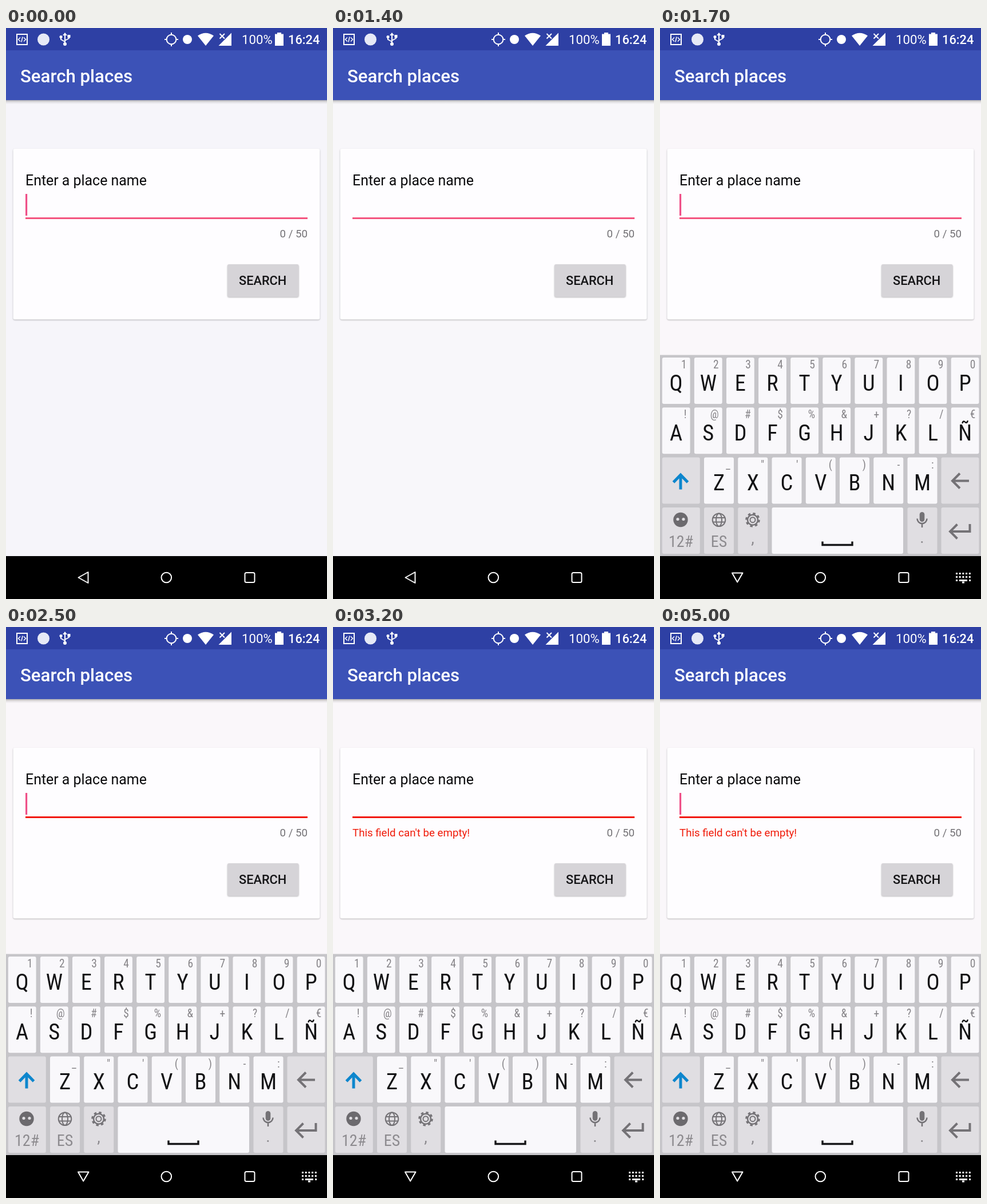
An HTML page for the animation above (5100 ms loop, 561x998 px).

```html
<!DOCTYPE html>
<html lang="en">
<head>
<meta charset="utf-8">
<title>Search places</title>
<style>
  html, body { margin: 0; width: 100%; height: 100%; overflow: hidden; background: #f8f7fa; }
  svg { display: block; width: 100%; height: 100%; font-family: Roboto, sans-serif; }
  .medium { font-weight: 500; }
  .line { fill: none; stroke: #fff; stroke-width: 2; }
  .raised { filter: drop-shadow(0 1.3px 1.3px rgba(0, 0, 0, .28)); }
  #keyboard text { font-family: "Roboto Condensed", Roboto, sans-serif; font-stretch: 75%; }
  .letter { font-size: 38.5px; fill: #121214; text-anchor: middle; }
  .hint { font-size: 19.5px; fill: #858387; text-anchor: end; }
  .label { font-size: 28px; fill: #8d8b8f; text-anchor: middle; }
  .glyph { fill: none; stroke: #747276; }
</style>
</head>
<body>
<svg viewBox="0 0 561 998">
  <defs>
    <linearGradient id="shade" x2="0" y2="1">
      <stop stop-color="#000" stop-opacity=".3"/>
      <stop offset=".45" stop-color="#000" stop-opacity=".1"/>
      <stop offset="1" stop-color="#000" stop-opacity="0"/>
    </linearGradient>
  </defs>
  <rect id="backdrop" width="561" height="998"/>

  <!-- app bar and status bar -->
  <rect y="126" width="561" height="7" fill="url(#shade)"/>
  <rect width="561" height="126" fill="#3c52b7"/>
  <rect width="561" height="39" fill="#2e40a4"/>
  <text class="medium" x="25" y="94.5" font-size="31.2" fill="#fff">Search places</text>
  <g fill="#fff">
    <path class="line" d="M19 11H37V29H19Z"/>
    <path class="line" stroke-width="1.5" style="stroke-width:1.5" d="M25 16.5L21.5 20L25 23.5M31 16.5L34.5 20L31 23.5M29 15.5L27 24.5"/>
    <circle cx="65.5" cy="20" r="10.5" fill="#e6e9f6"/>
    <path class="line" d="M103 12V27M103 24L96 20V16M103 22L110 18V14"/>
    <path d="M103 8L107 13H99ZM107.5 12h5v5h-5Z"/>
    <circle cx="96" cy="15.5" r="2.5"/><circle cx="103" cy="28" r="3"/>
    <path class="line" d="M289 8V12M289 28V32M277 20H281M297 20H301"/>
    <circle class="line" cx="289" cy="20" r="8.3"/>
    <circle cx="317" cy="20" r="8"/>
    <path d="M349 31L335 13.5Q349 4 363 13.5Z"/>
    <path d="M394 8.5V31H371.5Z"/>
    <path class="line" d="M373.5 10L382 18.5M382 10L373.5 18.5" stroke="#fff"/>
    <path d="M474 8H481V10.5H485V31H470V10.5H474Z"/>
    <text x="412" y="28" font-size="22.2">100%</text>
    <text class="medium" x="493" y="28" font-size="21.8">16:24</text>
  </g>

  <!-- search card -->
  <rect class="raised" x="12.5" y="211" width="536" height="298.5" rx="3" fill="#fefdff"/>
  <text x="34" y="274.8" font-size="24.9" fill="#0a0a0c">Enter a place name</text>
  <rect id="cursor" x="34" y="290" width="3.2" height="38" fill="#ef4f88"/>
  <rect id="underline" x="34" y="331" width="493" height="3"/>
  <text id="error" x="34" y="365.5" font-size="18.7" fill="#f01a08">This field can't be empty!</text>
  <text x="527" y="365.5" font-size="18.7" fill="#737175" text-anchor="end">0 / 50</text>
  <rect class="raised" x="387" y="413" width="124.5" height="57" rx="3" fill="#d6d4d8"/>
  <text class="medium" x="448.7" y="449" font-size="21.8" fill="#141416" text-anchor="middle">SEARCH</text>

  <!-- navigation bar, with the keyboard sliding over it -->
  <rect y="923" width="561" height="75"/>
  <g id="keyboard"><rect y="571.5" width="561" height="351.5" fill="#c6c5c9"/></g>
  <g class="line" stroke-linejoin="round">
    <path id="back" d="M126.5 960.5L143.5 951V970Z"/>
    <path id="hide" d="M126 952.5H144.5L135.2 968.5Z"/>
    <circle cx="280.3" cy="960.5" r="8.8"/>
    <rect x="417.5" y="952" width="17" height="17" rx="2.5"/>
    <path id="switcher" stroke-width="3" style="stroke-width:3" stroke-dasharray="3 2.7" d="M517 953.5H543M517 959.5H543"/>
    <path id="switcherBar" style="stroke-width:3" d="M517 965.5h3M523 965.5H537M540 965.5h3M528 969h4"/>
  </g>
</svg>
<script>
const byId = id => document.getElementById(id);
const keyboard = byId('keyboard');
const add = markup => keyboard.insertAdjacentHTML('beforeend', markup);
const escape = s => s.replace(/&/g, '&amp;');
const rowTop = row => 576 + row * 87.3;

function key(x, row, width, fill = '#f9f8fb') {
  add(`<rect x="${x}" y="${rowTop(row)}" width="${width}" height="81" rx="3" fill="${fill}"/>`);
}

function letterRow(letters, hints, row, left, pitch, width) {
  [...letters].forEach((letter, i) => {
    const x = left + i * pitch, top = rowTop(row);
    key(x, row, width);
    add(`<text class="letter" x="${x + width / 2}" y="${top + 57.7}">${letter}</text>
      <text class="hint" x="${x + width - 6}" y="${top + 19}">${escape(hints[i])}</text>`);
  });
}

letterRow('QWERTYUIOP', '1234567890', 0, 3.8, 56.1, 48.8);
letterRow('ASDFGHJKLÑ', '!@#$%&+?/€', 1, 3.8, 56.1, 48.8);
letterRow('ZXCVBNM', `_"'()-:`, 2, 77, 59.25, 52);

const dim = '#e0dee2';
for (const row of [2, 3]) {
  key(3.8, row, 66, dim);
  key(491.5, row, 66, dim);
}
for (const x of [77, 136.25, 432.5]) key(x, 3, 52, dim);
key(195.5, 3, 229.5);

add(`
  <path class="glyph" style="stroke:#0d86cd" stroke-width="5" d="M36 806.5V781M23.5 794L36 781L48.5 794"/>
  <path class="glyph" stroke-width="4" d="M540 791.5H512M524 778.5L511 791.5L524 804.5"/>
  <path class="glyph" stroke-width="4" d="M541.5 867V880H508M519.5 867.5L507 880L519.5 892.5"/>
  <circle cx="36" cy="859.5" r="12.7" fill="#6c6a6e"/>
  <circle cx="31" cy="858.5" r="2.6" fill="${dim}"/><circle cx="41" cy="858.5" r="2.6" fill="${dim}"/>
  <g class="glyph" stroke-width="2">
    <circle cx="103" cy="859.7" r="11.3"/><ellipse cx="103" cy="859.7" rx="5" ry="11.3"/>
    <path d="M92 856H114M92 863.5H114"/>
    <circle cx="162" cy="859.7" r="11.3" stroke-width="3" stroke-dasharray="4.44"/>
    <circle cx="162" cy="859.7" r="9" stroke-width="2.5"/><circle cx="162" cy="859.7" r="4.5"/>
    <path stroke-width="2.5" d="M449.5 857.5A8.5 8.5 0 0 0 466.5 857.5M458 866V873"/>
  </g>
  <rect x="453.7" y="846" width="8.6" height="17" rx="4.3" fill="#747276"/>
  <path class="glyph" style="stroke:#161618" stroke-width="3.4" d="M284 897.5V903.5H336V897.5"/>
  <text class="label" x="36.5" y="906.5">12#</text>
  <text class="label" x="103" y="906.5">ES</text>
  <text class="label" x="162" y="901">,</text>
  <text class="label" x="458" y="899.5">.</text>`);

const LOOP = 5100, KEYBOARD_IN = 1600, KEYBOARD_SET = 1700, ERROR = 2500;
const cursorToggles = [200, 700, 1200, 1600, 2200, 2500, 3200, 3700, 4200, 4700];
const show = (id, visible) => byId(id).style.display = visible ? '' : 'none';

function render(now) {
  // The screen refreshes ten times a second.
  const t = Math.floor(now % LOOP / 100) * 100;
  const typing = t >= KEYBOARD_IN;
  const entering = t < KEYBOARD_SET;

  byId('backdrop').setAttribute('fill', typing ? '#faf7fa' : t < 700 ? '#f6f5fa' : '#f8f7fa');
  show('cursor', cursorToggles.filter(time => time <= t).length % 2 === 0);
  byId('underline').setAttribute('fill', t < ERROR ? '#f4547f' : '#f2190f');
  byId('error').setAttribute('opacity', Math.min(1, Math.max(0, (t - ERROR) / 200)));

  show('keyboard', typing);
  keyboard.setAttribute('transform', `translate(0 ${entering ? 147 : 0})`);
  keyboard.setAttribute('opacity', entering ? .5 : 1);
  show('back', !typing);
  for (const id of ['hide', 'switcher', 'switcherBar']) show(id, typing);
  requestAnimationFrame(render);
}
render(performance.now());
</script>
</body>
</html>
```
